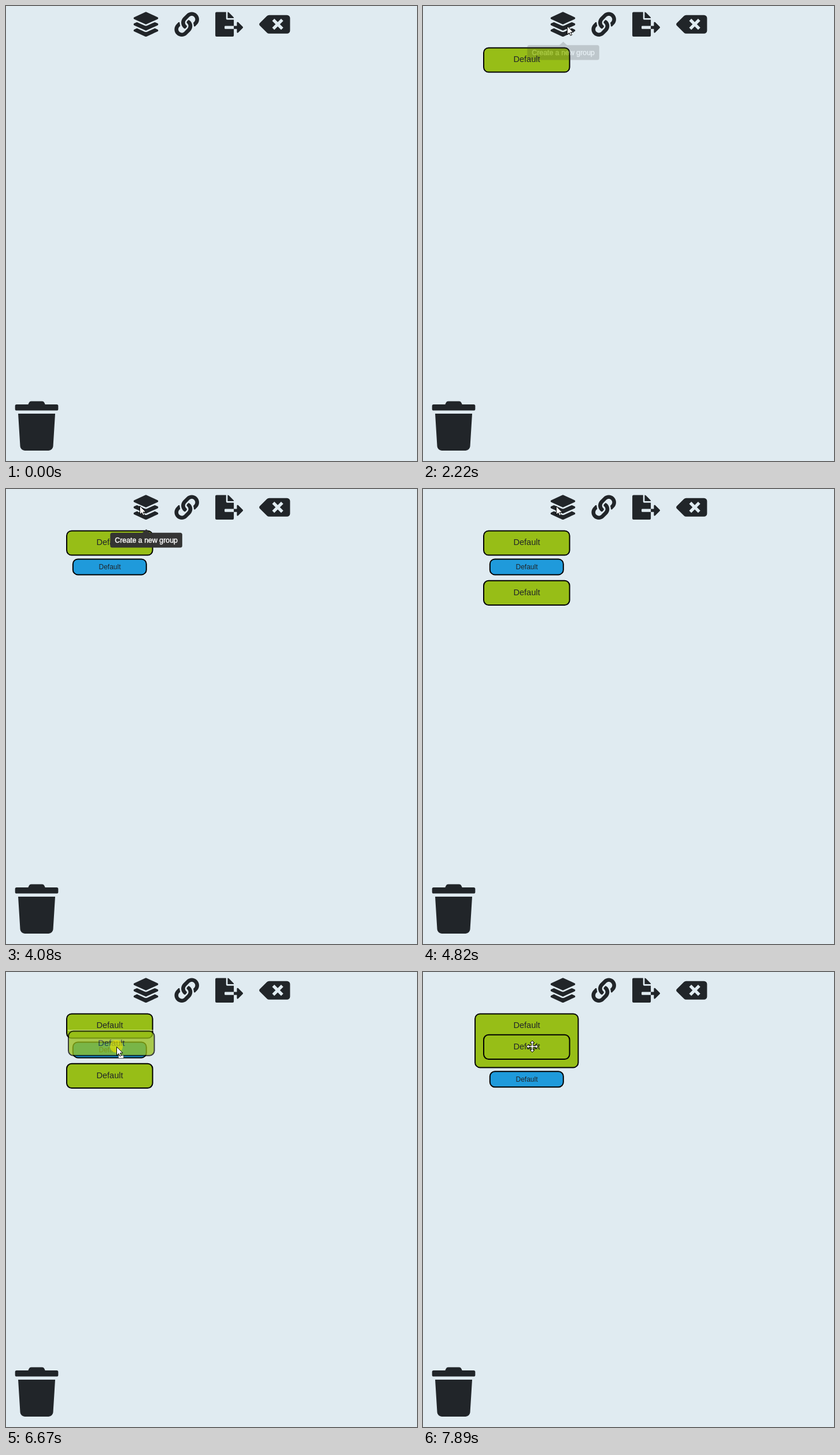
These frames come from a looping animation (711 by 788 pixels, 7990 ms). An HTML page:

```html
<!DOCTYPE html>
<html lang="en">
<head>
<meta charset="utf-8">
<title>Group editor</title>
<style>
html, body { margin: 0; width: 100%; height: 100%; overflow: hidden; background: #e0ebf1; }
svg { display: block; width: 711px; height: 788px; font-family: Arial, "Liberation Sans", sans-serif; text-anchor: middle; }
.icon { fill: #212529; }
.label { fill: #212529; stroke: none; }
</style>
</head>
<body>
<svg viewBox="0 0 711 788">
  <defs>
    <path id="band" d="M500 236l-58-26-162 73q-24 11-48 0L70 210l-58 26c-16 8-16 32 0 40l233 106q11 5 22 0L500 276c16-8 16-32 0-40z"/>
    <path id="loop" d="M467 45c-59-60-155-60-215 0l-67 67c-59 59-59 155 0 215q10 10 21 17c6 4 15 4 20-2l21-21c9-8 12-19 12-30q0-8-7-12-6-4-10-9c-28-28-28-73 0-101l67-68c28-28 74-28 102 1 28 28 27 74-1 102l-13 13q-6 7-4 16 9 26 10 53c0 14 17 21 27 11l37-37c59-59 59-156 0-215z"/>
  </defs>
  <g class="icon">
    <g transform="translate(220.7 10.4) scale(.0833)">
      <path d="M12 148L245 254q11 5 22 0L500 148c16-8 16-33 0-40L267 2q-11-5-22 0L12 108c-16 7-16 32 0 40z"/>
      <use href="#band"/><use href="#band" y="128"/>
    </g>
    <g transform="translate(291.4 10.4) scale(.0833)">
      <use href="#loop"/><use href="#loop" transform="rotate(180 256 256)"/>
    </g>
    <path transform="translate(362.1 10.4) scale(.0833)" d="M384 122q0-10-7-17L279 7q-7-7-17-7h-6v128h128zM571 308l-96-96c-10-10-27-3-27 11v65h-64v64h64v65c0 14 17 21 27 11l96-96q10-12 0-24zM192 336v-32q0-16 16-16h176V160H248q-24 0-24-24V0H24Q0 0 0 24v464q0 24 24 24h336q24 0 24-24V352H208q-16 0-16-16z"/>
    <g transform="translate(438.1 10.4) scale(.0833)">
      <path d="M576 64H205q-26 0-45 19L9 233c-12 13-12 33 0 46l151 150q19 19 45 19h371a64 64 0 0 0 64-64V128a64 64 0 0 0-64-64z"/>
      <path d="M291 163l186 186M477 163L291 349" stroke="#e0ebf1" stroke-width="64"/>
    </g>
    <path transform="translate(15.7 684.6) scale(.16667)" d="M432 32H312l-9-19Q296 0 281 0H167q-15 0-22 13l-9 19H16A16 16 0 0 0 0 48v32a16 16 0 0 0 16 16h416a16 16 0 0 0 16-16V48a16 16 0 0 0-16-16zM53 467a48 48 0 0 0 48 45h246a48 48 0 0 0 48-45l21-339H32z"/>
  </g>
  <g id="scene"></g>
</svg>
<script>
const LOOP = 7990, NEST = 7520, GRAB = 6290;
const scene = document.getElementById('scene');
const GREEN = '#97be17', BLUE = '#1f9adb';

// Pointer path: time, x, y
const path = [
  [980, 252, 76], [1060, 249, 34], [2560, 249, 34], [2720, 307, 39],
  [3600, 307, 39], [3850, 231, 28.5], [4300, 231, 28.5], [4320, 230, 29],
  [5330, 230, 29], [5520, 236, 72], [5700, 227, 130], [5900, 203, 189],
  [5980, 199, 196], [6130, 194, 195], [GRAB, 188, 185], [6670, 191, 129],
  [6830, 187, 99], [6910, 186, 101], [7200, 186, 101], [7270, 190, 101],
  [7760, 190, 101], [7890, 189, 129]
];
const presses = [[2070, 2150], [3380, 3460], [4490, 4570], [GRAB, NEST]];
const tips = [
  ['Create a new group', 242.6, 124.6, 1120, 2070],
  ['Create a new Interface', 312.6, 141, 2680, 3380],
  ['Create a new group', 242.6, 124.6, 3830, 4490]
];

const clamp = v => Math.min(1, Math.max(0, v));
const ease = v => 1 - (1 - clamp(v)) ** 2.4;
const within = (t, [a, b]) => t >= a && t < b;

function pointer(t) {
  let [t0, x0, y0] = [210, 674, 760];
  if (t < 980) {
    const p = 1 - (1 - clamp((t - t0) / 770)) ** 1.7;
    return [x0 + (252 - x0) * p, y0 + (76 - y0) * p];
  }
  for (const [t1, x1, y1] of path) {
    if (t < t1) {
      const p = (t - t0) / (t1 - t0);
      return [x0 + (x1 - x0) * p, y0 + (y1 - y0) * p];
    }
    [t0, x0, y0] = [t1, x1, y1];
  }
  return [x0, y0];
}

// Bordered box centred on the column, given its outer size
const box = (y, w, h, fill, size, base) =>
  `<rect x="${180.3 - w / 2}" y="${y + 1}" width="${w - 2}" height="${h - 2}" rx="8.5" fill="${fill}" stroke="#000" stroke-width="2"/>
  <text class="label" x="179.5" y="${y + base}" font-size="${size}">Default</text>`;
const group = (y, w = 150.6, h = 44.2) => box(y, w, h, GREEN, 14.6, 26);
const link = y => box(y, 129, 29, BLUE, 12, 18.4);

function boxes(t) {
  if (t >= NEST) return group(71.4, 180.4, 95) + group(107.8) + link(171.2);
  return (t >= 2150 ? group(71.4) : '') + (t >= 3460 ? link(120.4) : '') + (t >= 4570 ? group(157.8) : '');
}

function tooltip([text, cx, w, start, end], t) {
  const p = t < end ? ease((t - start) / 300) : 1 - ease((t - end) / 300);
  if (p <= 0) return '';
  return `<g opacity="${p}" transform="translate(${cx} ${10 * p - 10})" fill="#333">
    <path d="M-7 76.5L0 70L7 76.5z"/>
    <rect x="${-w / 2}" y="76" width="${w}" height="25.6" rx="3.5"/>
    <text y="92.8" font-size="12.4" fill="#fff" stroke="#fff" stroke-width="${p < 1 ? .4 : .1}">${text}</text></g>`;
}

const ghost = (x, y) => `<g opacity=".75" transform="translate(${x - 188} ${y - 185})">
  <path d="M104 157.2h150" stroke="#fff"/>${group(157.8)}</g>`;

const arrow = '<path d="M.5 .8V15.5L3.9 12.4L6.2 17.2L8.6 16.1L6.4 11.5H11z" fill="#fff" stroke="#000"/>';
const dropMark = '<rect x="3.5" y="15.5" width="9" height="5" fill="#fff" stroke="#000" stroke-dasharray="1 1"/>';
const wing = 'L-1.3 -1.3V-6H-4L0 -10L4 -6H1.3V-1.3';
const cross = '<g fill="#fff" stroke="#000">' +
  [0, 90, 180, 270].map(a => `<path transform="rotate(${a})" d="M${wing.slice(1)}"/>`).join('') +
  '<rect x="-1.5" y="-1.5" width="3" height="3" stroke="none"/></g>';

function cursor(t, x, y) {
  const drag = within(t, [GRAB, NEST]);
  const shape = drag ? dropMark + arrow : t > 5510 ? cross : arrow;
  const press = presses.some(p => within(t, p)) ? '<circle r="11" fill="#f0e800" opacity=".6"/>' : '';
  return `<g transform="translate(${x} ${y})">${press}${shape}</g>`;
}

function draw(now) {
  const t = now % LOOP, [x, y] = pointer(t);
  scene.innerHTML = boxes(t) +
    (within(t, [GRAB + 60, NEST]) ? ghost(x, y) : '') +
    tips.map(tip => tooltip(tip, t)).join('') +
    (t >= 210 ? cursor(t, x, y) : '');
}

const begin = performance.now();
function tick() {
  draw(performance.now() - begin);
  requestAnimationFrame(tick);
}
tick();
</script>
</body>
</html>
```
